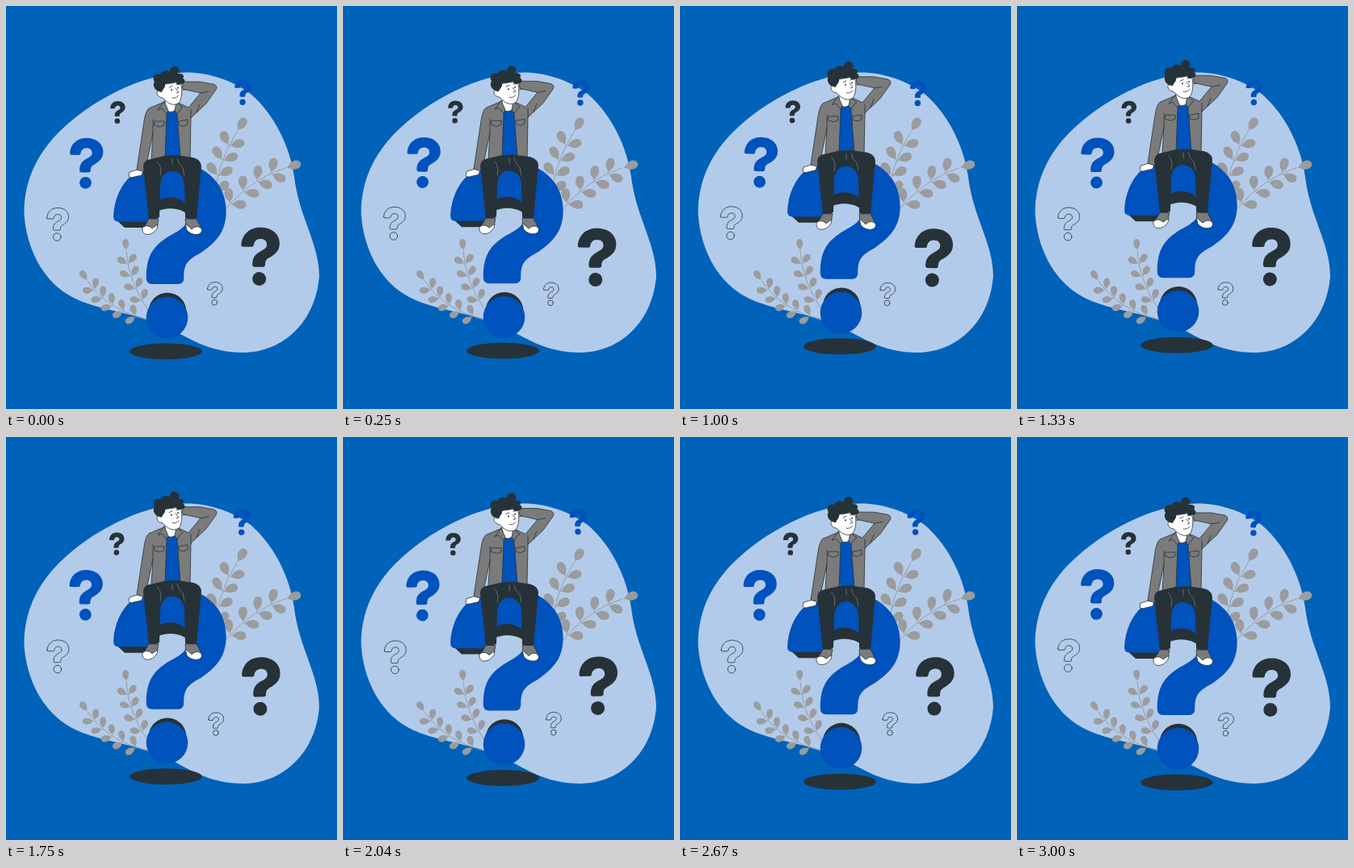
Recreate the animation shown at these times as an HTML page. Size 410 by 500 pixels, loop 3.04 s.

```html
<!DOCTYPE html>
<html lang="en">
<head>
<meta charset="utf-8">
<title>Thinking it over</title>
<style>
  html, body { margin: 0; width: 100%; height: 100%; overflow: hidden; background: #0062b9; }
  svg { display: block; width: 410px; height: 500px; }
  .ink { fill: #263238; }
  .blue { fill: #0052bc; }
  .line { fill: none; stroke: #263238; stroke-width: .8; stroke-linecap: round; stroke-linejoin: round; }
  .skin { fill: #fff; }
  .coat { fill: #7b7b7b; }
  .skin, .coat { stroke: #263238; stroke-width: .8; stroke-linejoin: round; }
  #hook, #dot { vector-effect: non-scaling-stroke; }
  #plants { fill: #9b9c9e; }
  #plants .stem { fill: none; stroke: #9b9c9e; }
</style>
</head>
<body>
<svg viewBox="0 0 410 500">
  <defs>
    <path id="hook" d="M0 22C1 8 11 0 24 0C38 0 48 8 48 20C48 29 43 33 37 37C31 40 30 42 30 47Q30 49.500 27.500 49.500H16.500Q14 49.500 14 47C14 38 17 34 24 30C30 27 32 25 32 21.500C32 17 29 14.500 24 14.500C19 14.500 16 18 15.500 22.500Q15.500 24.300 13 24.300H2Q0 24.300 0 22Z"/>
    <circle id="dot" cx="22.600" cy="64.500" r="8.600"/>
    <path id="leaf" d="M0 0Q3 0 5 -2C9 -7 20 -7 20 0C20 6 10 7 5 2Q3 0 0 0Z"/>
  </defs>

  <path fill="#b3cbea" d="M222 82.500C165 85 105 118 66 156C38 184 22 218 22.500 258C25 300 45 338 75 357C105 377 160 380 196 396C225 411 250 430 295 430C345 429 384 390 388 335C388 295 363 262 357 212C352 175 333 135 303 109C280 92 250 82 222 82.500Z"/>
  <g id="plants"></g>
  <g id="marks"></g>

  <g id="float">
    <ellipse class="ink" cx="198" cy="428.500" rx="45" ry="10"/>
    <circle class="ink" cx="200" cy="379" r="23.300"/>
    <circle class="blue" cx="199.500" cy="386.600" r="25.800"/>
    <path class="ink" d="M134 263L147 275H178V262ZM176 266C186 246 222 247 231 266V235H176Z"/>
    <use class="blue" href="#hook" transform="translate(133 193) scale(2.910 3.070)"/>

    <!-- hands, shirt and neck -->
    <path class="skin" d="M163 203L153 206L152 211Q154 214 159 212L168 210L170 204Z"/>
    <path class="skin" d="M222 94H214L211 98L216 104H222Z"/>
    <path class="blue" d="M196 128H212L217 190H196Z"/>
    <path class="skin" d="M197 114V128Q204 135 211 128V118Z"/>

    <!-- jacket -->
    <path class="coat" d="M196 119L177 127Q173 130 171 143L162 203L172 206L182 158L180 191L197 188L199 135Z"/>
    <path class="coat" d="M211 119L226 126L241 108L219 103Q217 98 220 94L240 94L257 97Q263 99 260 104L248 121L229 139L228 191L216 188L212 135Z"/>
    <path class="coat" d="M196 118L188 129L193 127L199 134L201 130ZM211 119L219 126L216 128L212 134L209 130Z"/>
    <path class="line" d="M182 158V141M229 139V128M241 108L251 106M236 132L240 122M184 143H196V148L190 150L184 148ZM214 143L225 141V147L220 149L215 148Z"/>

    <!-- legs -->
    <path class="ink" d="M179 190Q170 191 170 200L177 264Q184 267 190 262L191 222Q193 205 206 205Q219 206 221 221L222 263Q230 267 236 263L242 199Q242 191 232 188L211 185L196 186Z"/>
    <path fill="none" stroke="#8c9497" stroke-width=".6" d="M191 211L192 203Q191 196 187 193M221 211L219 201Q213 196 212 189M206 189V197"/>

    <!-- shoes -->
    <path class="coat" d="M177 264H189L187 274L180 281L170 276ZM222 264H236L242 276L231 281L223 273Z"/>
    <path class="skin" d="M169 275Q175 270 181 276L188 271L187 276Q182 284 174 283.500Q168 282 169 275ZM222 270L230 277Q236 271 242 276Q244 282 237 283.500Q229 284 224 278Z"/>

    <!-- head -->
    <path class="skin" d="M191 98L216 94C219 104 218 113 215 119C211 124 204 123 198 118L194 114C187 113 185 107 189 104Z"/>
    <path class="ink" d="M189 106C184 104 181 98 184 94C180 89 185 82 191 85C193 80 199 79 203 82C202 76 209 72 213 77C216 80 214 83 212 84C219 83 222 87 219 90C223 91 222 97 217 97C214 99 211 97 210 94C205 97 200 95 197 97C198 101 194 103 193 107Z"/>
    <path class="line" d="M202 101L206 99M211 98L214 97M210 102L214 107L211 108M206 114Q211 115 214 111"/>
    <circle class="ink" cx="205" cy="104" r="1"/>
    <circle class="ink" cx="213" cy="101.500" r="1"/>
  </g>
</svg>
<script>
const byId = id => document.getElementById(id);
const use = (id, x, y, turn, size) =>
  `<use href="#${id}" transform="translate(${x} ${y}) rotate(${turn}) scale(${size})"/>`;

function mark(kind, x, y, size) {
  byId('marks').innerHTML +=
    `<g class="${kind}">${use('hook', x, y, 0, size)}${use('dot', x, y, 0, size)}</g>`;
}

// A curved stem from a to b, bent towards c, with pairs of leaves and one at the tip
function plant(a, c, b, pairs, size) {
  const mix = (p, q, t) => p.map((v, k) => v + (q[k] - v) * t);
  let parts = `<path class="stem" d="M${a}Q${c} ${b}"/>`;
  for (let i = 1; i <= pairs + 1; i++) {
    const t = i / (pairs + 1), p = mix(a, c, t), q = mix(c, b, t), [x, y] = mix(p, q, t);
    const along = Math.atan2(q[1] - p[1], q[0] - p[0]) * 180 / Math.PI;
    for (const side of i > pairs ? [0] : [-50, 50]) parts += use('leaf', x, y, along + side, size);
  }
  byId('plants').innerHTML += parts;
}

mark('blue', 79, 164, .86);
mark('ink', 129, 118, .385);
mark('blue', 283, 91, .435);
mark('ink', 291.5, 274.5, .99);
mark('line', 50.7, 250.7, .56);
mark('line', 249.7, 342.5, .39);

plant([258, 250], [258, 200], [286, 156], 4, 1);
plant([262, 264], [300, 215], [346, 201], 4, 1);
plant([178, 380], [152, 345], [149, 304], 4, .75);
plant([178, 390], [125, 377], [101, 341], 5, .75);

const loop = 3040, lead = 50, lift = 7.9;

function draw() {
  const turn = (performance.now() + lead) / loop * 2 * Math.PI;
  const rise = lift * (1 - Math.cos(turn)) / 2;
  byId('float').setAttribute('transform', `translate(0 ${-rise})`);
  byId('marks').setAttribute('transform', `rotate(${Math.sin(turn)} 195 231)`);
  requestAnimationFrame(draw);
}
draw();
</script>
</body>
</html>
```
